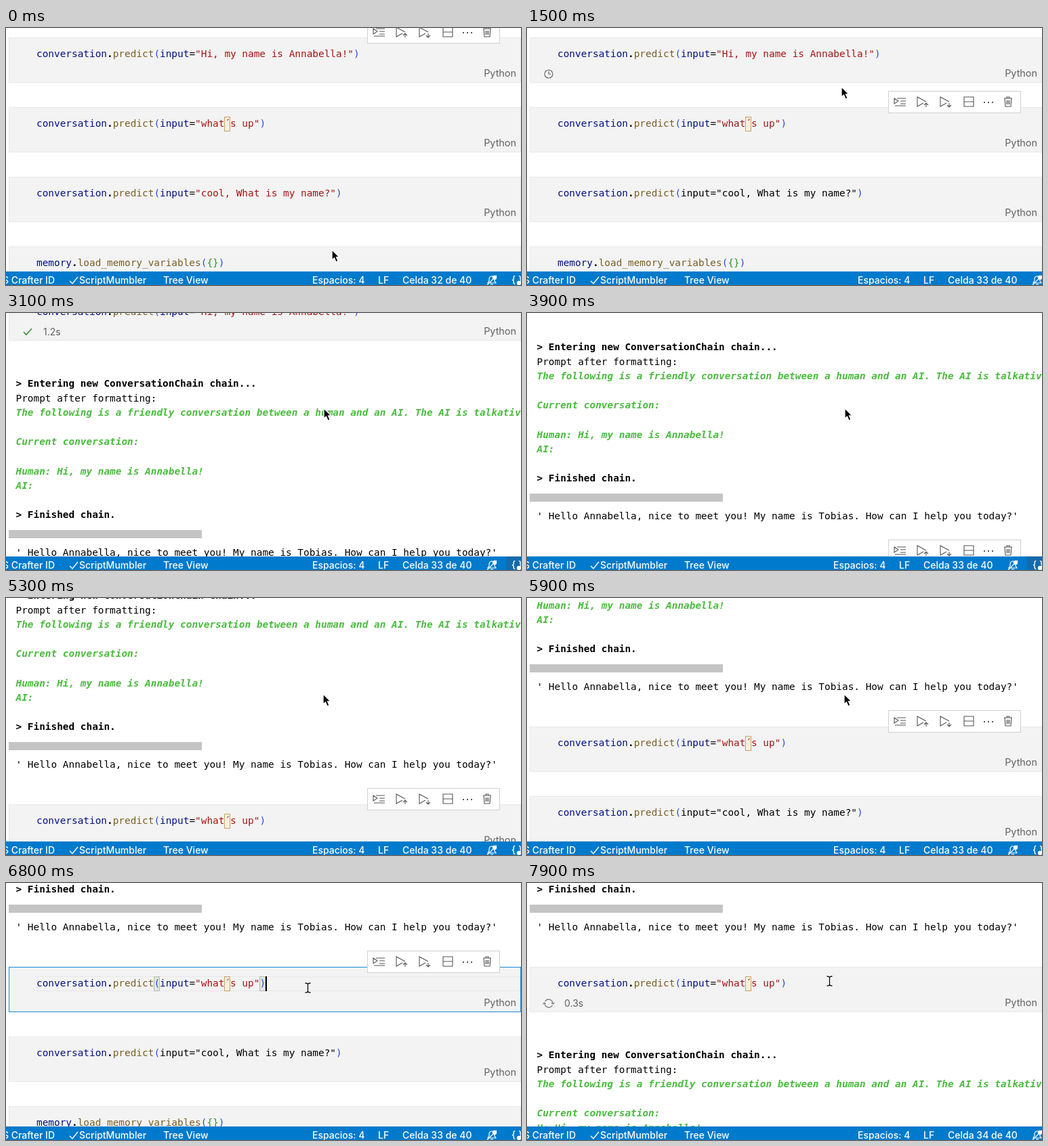
Write an HTML page with a canvas that moves like this. It is 760 px wide and 380 px high and loops after 8 s.

```html
<!DOCTYPE html>
<html lang="es">
<head>
<meta charset="utf-8">
<style>
  html, body { margin: 0; width: 100%; height: 100%; overflow: hidden; background: #fff; }
  canvas { display: block; }
</style>
</head>
<body>
<canvas id="stage" width="760" height="380"></canvas>
<script>
const ctx = document.getElementById('stage').getContext('2d');
const LOOP = 8000, STEP = 100;
const SIZE = 14.4, LINE = 21.6, ADVANCE = SIZE * 0.602;
const MONO = `${SIZE}px "DejaVu Sans Mono", monospace`;
const UI = 'Inter, sans-serif';
const BLACK = '#000', NAVY = '#001080', BROWN = '#795e26', RED = '#a31515',
      BLUE = '#2a4fd8', GREEN = '#319331', LOG = '#4bbb3f', ACCENT = '#0078d0';
const CODE_X = 45, PITCH = 103;

const between = (t, from, to) => t >= from && t < to;
const clamp = v => Math.min(1, Math.max(0, v));

function text(str, x, y, color, font, align = 'left') {
  ctx.font = font;
  ctx.fillStyle = color;
  ctx.textAlign = align;
  ctx.fillText(str, x, y);
}

function box(x, y, w, h, fill, stroke) {
  if (fill) { ctx.fillStyle = fill; ctx.fillRect(x, y, w, h); }
  if (stroke) {
    ctx.strokeStyle = stroke;
    ctx.lineWidth = 1;
    ctx.strokeRect(x + 0.5, y + 0.5, w - 1, h - 1);
  }
}

function icon(x, y, path, color, { width = 1.1, fill, angle = 0 } = {}) {
  ctx.save();
  ctx.translate(x, y);
  ctx.rotate(angle);
  const shape = new Path2D(path);
  if (fill) { ctx.fillStyle = fill; ctx.fill(shape); }
  ctx.strokeStyle = color;
  ctx.lineWidth = width;
  ctx.stroke(shape);
  ctx.restore();
}

// Code cells: lists of [text, color]
const predict = (input, plain) => [
  ['conversation', NAVY], ['.', BLACK], ['predict', BROWN], ['(', BLUE],
  ['input', plain ? BLACK : NAVY], ['=', BLACK],
  [`"${input}"`, plain ? BLACK : RED], [')', BLUE]
];
const loadMemory = [
  ['memory', NAVY], ['.', BLACK], ['load_memory_variables', BROWN],
  ['(', BLUE], ['{}', GREEN], [')', BLUE]
];

// Log lines: style letter (b = bold, n = normal, g = green), then the text
const header = [
  'b> Entering new ConversationChain chain...',
  'nPrompt after formatting:',
  'gThe following is a friendly conversation between a human and an AI. The AI is talkative',
  'g', 'gCurrent conversation:'
];
const firstLog = [...header, 'g', 'gHuman: Hi, my name is Annabella!', 'gAI:'];
const secondLog = [...header, 'gH: Hi, my name is Annabella!'];
const ending = ['n', 'b> Finished chain.'];
const reply = "' Hello Annabella, nice to meet you! My name is Tobias. How can I help you today?'";

const runs = [
  { queued: 1300, start: 1700, output: 1900, end: 2900, log: firstLog },
  { queued: 7200, start: 7600, output: 7800, end: 9000, log: secondLog }
];

// [from, to, distance, easing power]
const scrolls = [[2900, 3900, 94, 2.5], [4900, 5300, 54, 2], [5600, 6500, 181, 2.5]];
const scrollAt = t => Math.round(scrolls.reduce((sum, [from, to, distance, power]) =>
  sum + distance * (1 - (1 - clamp((t - from) / (to - from))) ** power), 0));

// [time, x, y]
const pointerKeys = [
  [0, 481, 328], [500, 462, 58], [1300, 462, 58], [1800, 469, 141], [3900, 469, 141],
  [4700, 468, 142], [6500, 468, 142], [6700, 445, 155], [7200, 445, 155], [7600, 446, 145],
  [LOOP, 446, 145]
];

function pointerAt(t) {
  const i = pointerKeys.findIndex(key => key[0] > t);
  const [t0, x0, y0] = pointerKeys[i - 1], [t1, x1, y1] = pointerKeys[i];
  const p = (t - t0) / (t1 - t0), s = p * p * (3 - 2 * p);
  return [x0 + (x1 - x0) * s, y0 + (y1 - y0) * s];
}

function drawCell(top, code, editing, brackets) {
  const source = code.map(part => part[0]).join('');
  const column = n => CODE_X + n * ADVANCE;
  box(4, top, 756, 67, '#f3f3f3', editing ? '#1a8ad4' : '#e8e8e8');
  if (editing) box(CODE_X, top + 14, 714, 22, null, '#e8e8e8');
  if (brackets) {
    for (const n of [source.indexOf('('), source.length - 1])
      box(Math.round(column(n)), top + 14, 9, 22, '#dfe7df', '#b9b9b9');
  }
  const accent = source.indexOf('´');
  if (accent > 0) box(Math.round(column(accent)), top + 14, 9, 22, '#f7f0e2', '#c9a064');
  let n = 0;
  for (const [part, color] of code) {
    text(part, column(n), top + 29, color, part === '.' ? 'bold ' + MONO : MONO);
    n += part.length;
  }
  if (editing) box(Math.round(column(n)), top + 14, 2, 22, BLACK);
  text('Python', 753, top + 58, '#616161', `14.4px ${UI}`, 'right');
}

function drawRun(t, top, run) {
  if (t < run.queued) return;
  const elapsed = Math.min(t, run.end) - run.start, done = t >= run.end;
  if (elapsed < 0) {
    icon(32, top + 54, 'M6 0A6 6 0 1 1-6 0A6 6 0 1 1 6 0M0-4V0H3', '#616161');
    return;
  }
  if (done) icon(32, top + 54, 'M-6 0L-2 4L6-5', '#388a34', { width: 1.6 });
  else icon(32, top + 54, 'M-6 1A6 6 0 0 1 5-3M6-6V-3H3M6-1A6 6 0 0 1-5 3M-6 6V3H-3', '#707070',
    { angle: (elapsed - 900) / 1500 * Math.PI * 2 });
  text((elapsed / 1000).toFixed(1) + 's', 55, top + 59, '#616161', `14px ${UI}`);

  const p = (elapsed - 660) / 4000;
  if (!done && p >= 0) {
    const unit = 15.3, width = unit * (1 + 4 * p);
    box(4 + unit * (0.5 + 50 * p) - width / 2, top - 3, width, 2, ACCENT);
  }
  if (t < run.output) return;
  const lines = done ? [...run.log, ...ending] : run.log;
  lines.forEach((line, i) => {
    const style = { b: 'bold ', n: '', g: 'italic bold ' }[line[0]];
    text(line.slice(1), 14.5, Math.round(top + 135 + i * LINE),
      line[0] === 'g' ? LOG : BLACK, style + MONO);
  });
  const barY = Math.round(top + 131 + lines.length * LINE);
  box(4, barY, 285, 12, '#c4c4c4');
  if (done) text(reply, 14.5, top + 385, BLACK, MONO);
}

function drawToolbar(top) {
  const y = top + 16, gray = '#555', play = 'M-7-7L6 0L-7 7Z';
  box(533, top, 196, 33, '#fff', '#d0d0d0');
  icon(550, y, 'M-8-5L-2-1L-8 3ZM-4-5H9M1-1H9M1 3H9M-7 6H9', gray);
  icon(583, y, 'M2 2L-7 7V-7L6 0M6 8V2M3 5L6 2L9 5', gray);
  icon(617, y, 'M2 2L-7 7V-7L6 0M6 2V8M3 5L6 8L9 5', gray);
  icon(652, y, 'M-7-7H7V7H-7ZM-7 0H7', gray);
  for (const x of [675, 681, 687]) box(x - 1, y, 2, 2, gray);
  icon(710, y, 'M-6-5H6M-2-5V-7H2V-5M-5-5L-4 7H4L5-5M-2-2V4M0-2V4M2-2V4', gray);
}

function drawStatus(t, focus, busy) {
  const font = `500 14px ${UI}`, white = '#fff', y = 378, shift = busy ? 36 : 0;
  box(0, 360, 760, 20, '#007acc');
  text('S Crafter ID', 72, y, white, font, 'right');
  icon(100, 373, 'M-6 1L-2 5L6-5', white, { width: 1.4 });
  text('ScriptMumbler', 108, y, white, font);
  text('Tree View', 232, y, white, font);
  text('Espacios: 4', 452 + shift, y, white, font);
  text('LF', 549 + shift, y, white, font);
  text(`Celda ${32 + focus} de 40`, 585 + shift, y, white, font);
  icon(717 + shift, 373, 'M-6 4H6L4 1V-2A4 4 0 0 0-4-2V1ZM-2 6H2M-7 7L7-7', white, { width: 1.2 });
  icon(721 + shift, 369, 'M3 0A3 3 0 1 1-3 0A3 3 0 1 1 3 0', white, { width: 0.5, fill: white });
  if (busy) return;
  if (between(t, 2900, 4700)) box(738, 360, 22, 20, '#146bac');
  text('{ }', 746, y - 1, white, font);
  icon(757, 377, 'M3 0A3 3 0 1 1-3 0A3 3 0 1 1 3 0', white, { width: 0.5, fill: white });
}

function drawPointer(t) {
  const [x, y] = pointerAt(t).map(Math.round);
  if (between(t, 400, 1500) || t >= 6600) {
    const beam = 'M-4-7Q0-7 0-5Q0-7 4-7M0-5V5M-4 7Q0 7 0 5Q0 7 4 7';
    icon(x + 0.5, y, beam, '#fff', { width: 3 });
    icon(x + 0.5, y, beam, BLACK, { width: 1.3 });
  } else {
    icon(x, y, 'M0 0V15L3.5 12L6 18L9 16.5L6.5 11H11Z', '#fff', { width: 1.3, fill: BLACK });
  }
}

function draw(t) {
  box(0, 0, 760, 380, '#fff');
  const first = 14 - scrollAt(t);
  const second = first + (t >= runs[0].end ? 439 : t >= runs[0].output ? 376 : PITCH);
  const third = second + (t >= runs[1].output ? 376 : PITCH);
  const tops = [first, second, third, third + PITCH];
  const cells = [
    predict('Hi, my name is Annabella!'),
    predict('what´s up'),
    predict('cool, What is my name?', t >= 800),
    loadMemory
  ];
  const editing = between(t, 800, 1300) ? 0 : between(t, 6700, 7200) ? 1 : -1;
  const brackets = between(t, 1000, 1300) || between(t, 6800, 7200);
  const focus = t < runs[0].queued ? 0 : t < runs[1].queued ? 1 : 2;

  cells.forEach((code, i) => drawCell(tops[i], code, i === editing, i === editing && brackets));
  runs.forEach((run, i) => drawRun(t, tops[i], run));
  drawToolbar(tops[focus] - 24);
  drawStatus(t, focus, runs.some(run => between(t, run.queued, run.end)));
  drawPointer(t);
}

const began = performance.now();
function tick() {
  const t = (performance.now() - began) % LOOP;
  draw(Math.floor(t / STEP) * STEP);
  requestAnimationFrame(tick);
}
tick();
</script>
</body>
</html>
```
